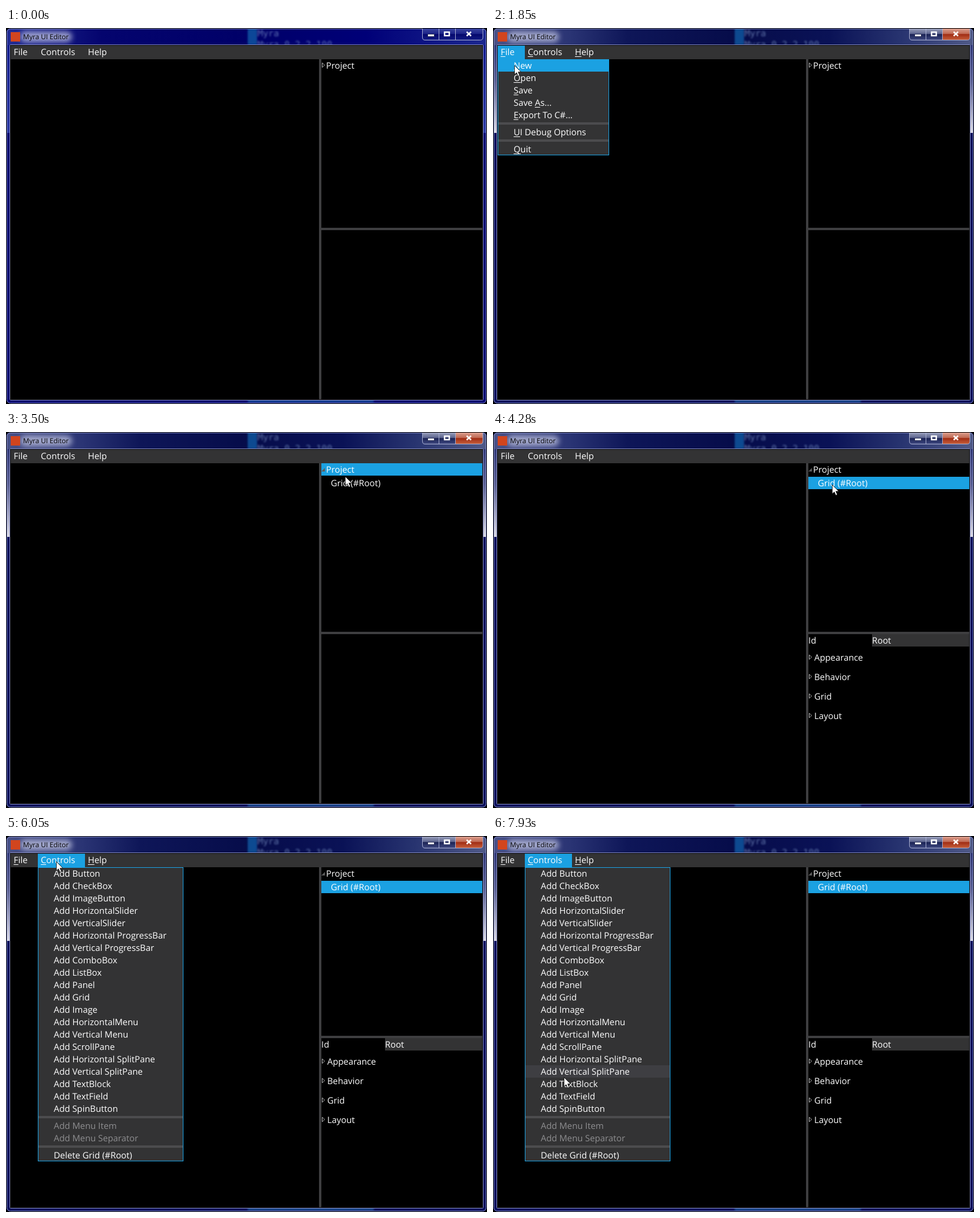
An HTML page that plays this animation: 816x638 px, repeating every 8000 ms.

```html
<!DOCTYPE html>
<html lang="en">
<head>
<meta charset="utf-8">
<title>Myra UI Editor</title>
<style>
  html, body { margin: 0; width: 100%; height: 100%; overflow: hidden; background: #000; }
  svg { display: block; width: 816px; height: 638px; }
  text { font: 14.85px "Open Sans", "Noto Sans", sans-serif; fill: #fff; white-space: pre; text-rendering: geometricPrecision; }
  .title { font-size: 11.6px; fill: #000; }
  .mono { font: 15px "DejaVu Sans Mono", monospace; fill: #8ca8d8; }
  .dim { fill: #8e8e90; }
</style>
</head>
<body>
<svg id="stage" viewBox="0 0 816 638" xmlns="http://www.w3.org/2000/svg">
  <defs>
    <filter id="blur" x="-30%" y="-100%" width="160%" height="300%"><feGaussianBlur stdDeviation="1.8"/></filter>
    <filter id="glow" x="-30%" y="-100%" width="160%" height="300%"><feGaussianBlur stdDeviation="5"/></filter>
    <clipPath id="pane"><rect x="1" y="1" width="814" height="636" rx="6"/></clipPath>
    <linearGradient id="barIdle">
      <stop offset="0" stop-color="#242e94"/><stop offset=".2" stop-color="#04046e"/>
      <stop offset=".5" stop-color="#000068"/><stop offset=".75" stop-color="#000078"/><stop offset="1" stop-color="#1c2890"/>
    </linearGradient>
    <linearGradient id="barLive">
      <stop offset="0" stop-color="#4a5288"/><stop offset=".16" stop-color="#2a3474"/><stop offset=".28" stop-color="#0e1658"/>
      <stop offset=".5" stop-color="#060c4a"/><stop offset=".7" stop-color="#0a1256"/>
      <stop offset=".85" stop-color="#283470"/><stop offset="1" stop-color="#505a88"/>
    </linearGradient>
    <linearGradient id="sideIdle" x2="0" y2="1">
      <stop offset="0" stop-color="#10188a"/><stop offset="1" stop-color="#2c3aa4"/>
    </linearGradient>
    <linearGradient id="sideLive" x2="0" y2="1">
      <stop offset="0" stop-color="#20286c"/><stop offset=".5" stop-color="#5a6094"/><stop offset="1" stop-color="#dcdce6"/>
    </linearGradient>
    <linearGradient id="btnIdle" x2="0" y2="1">
      <stop offset="0" stop-color="#3a44a0"/><stop offset=".45" stop-color="#1c2488"/>
      <stop offset=".5" stop-color="#04086c"/><stop offset="1" stop-color="#141c84"/>
    </linearGradient>
    <linearGradient id="btnLive" x2="0" y2="1">
      <stop offset="0" stop-color="#9aa0bc"/><stop offset=".45" stop-color="#5c648e"/>
      <stop offset=".5" stop-color="#1a2254"/><stop offset="1" stop-color="#404a82"/>
    </linearGradient>
    <linearGradient id="closeLive" x2="0" y2="1">
      <stop offset="0" stop-color="#dca090"/><stop offset=".45" stop-color="#c06852"/>
      <stop offset=".5" stop-color="#a02c14"/><stop offset="1" stop-color="#c8603c"/>
    </linearGradient>
  </defs>

  <g clip-path="url(#pane)">
    <g id="idle">
      <rect width="816" height="638" fill="#000070"/>
      <rect width="816" height="178" fill="url(#sideIdle)"/>
      <rect width="816" height="29" fill="url(#barIdle)"/>
    </g>
    <g id="live">
      <rect width="816" height="638" fill="#0a105c"/>
      <rect width="816" height="178" fill="url(#sideLive)"/>
      <rect width="816" height="29" fill="url(#barLive)"/>
    </g>
    <g filter="url(#blur)">
      <rect x="410" y="-6" width="16" height="35" fill="#1560a8" opacity=".75"/>
      <text class="mono" x="427" y="14" opacity=".65">Myra</text>
      <text class="mono" x="427" y="33" opacity=".65">Myra.0.2.2.100</text>
      <rect x="410" y="631" width="214" height="4" fill="#2c74b4" opacity=".7"/>
    </g>
    <rect x="24" y="6" width="88" height="18" rx="9" fill="#c4c8e4" opacity=".75" filter="url(#glow)"/>
  </g>
  <rect x="1.5" y="1.5" width="813" height="635" rx="6" fill="none" stroke="#8890c8"/>
  <rect x="8" y="7" width="16" height="16" fill="#d2451e"/>
  <text class="title" x="29" y="19">Myra UI Editor</text>

  <path id="buttons" d="M706.5 1V16Q706.5 20.5 711 20.5H804.5Q809 20.5 809 16V1Z" fill="url(#btnIdle)"/>
  <g id="liveButtons">
    <path d="M706.5 1V16Q706.5 20.5 711 20.5H762V1Z" fill="url(#btnLive)"/>
    <path d="M762 1V20.5H804.5Q809 20.5 809 16V1Z" fill="url(#closeLive)"/>
  </g>
  <path d="M706.5 1V16Q706.5 20.5 711 20.5H804.5Q809 20.5 809 16V1M734.5 1V20M762.5 1V20" fill="none" stroke="#a8aed0"/>
  <rect x="715.5" y="10.5" width="11" height="4" fill="#fff" stroke="#30365c"/>
  <rect x="744" y="7" width="8" height="6" fill="none" stroke="#fff" stroke-width="2.4"/>
  <path d="M781.5 6.5L789 13.5M789 6.5L781.5 13.5" stroke="#fff" stroke-width="2.4"/>

  <rect x="6.5" y="28.5" width="803" height="603" rx="1" fill="#000" stroke="#8a90c4"/>
  <rect x="8" y="30" width="800" height="23" fill="#333334"/>
  <rect x="531" y="53" width="4" height="577" fill="#3e3e40"/>
  <rect x="535" y="339" width="273" height="4" fill="#3e3e40"/>
</svg>

<script>
const NS = 'http://www.w3.org/2000/svg';
const stage = document.getElementById('stage');
const BLUE = '#1ba1e2', HOVER = '#3e3e42', PANEL = '#333334';
const LOOP = 8000, ROW = 21, TOP = 53;

function add(parent, tag, attrs, content) {
  const el = document.createElementNS(NS, tag);
  for (const k in attrs) el.setAttribute(k, attrs[k]);
  if (content) el.textContent = content;
  return parent.appendChild(el);
}
const group = (parent = stage) => add(parent, 'g', {});
const box = (parent, x, y, width, height, fill) => add(parent, 'rect', { x, y, width, height, fill });
const label = (parent, x, y, s, cls = '') => add(parent, 'text', { x, y, class: cls }, s);
const show = (el, on) => el.setAttribute('visibility', on ? 'visible' : 'hidden');
const arrow = (parent, y) => add(parent, 'path',
  { d: `M536.5 ${y - 4}V${y + 4}L540.5 ${y}Z`, fill: 'none', stroke: '#b4b4b4' });

// Underline the hot key letter of a label.
function hotkey(parent, text, x, y, i) {
  const pen = document.createElement('canvas').getContext('2d');
  pen.font = '14.85px "Open Sans", "Noto Sans", sans-serif';
  const start = pen.measureText(text.slice(0, i)).width;
  box(parent, Math.round(x + start), y + 2, Math.round(pen.measureText(text[i]).width), 1, '#fff');
}

// Menu bar
const bar = [['File', 8, 46], ['Controls', 54, 80], ['Help', 134, 54]].map(([name, x, w]) => {
  const back = box(stage, x, 30, w, 23, HOVER);
  label(stage, x + 5, 46, name);
  return { name, x, w, back };
});
const barKeys = group();
bar.forEach(b => hotkey(barKeys, b.name, b.x + 5, 46, 0));

// Tree
const projectBack = box(stage, 535, 53, 273, 21, HOVER);
const gridBack = box(stage, 535, 76, 273, 21, HOVER);
label(stage, 543, 69, 'Project');
const closedMark = group();
arrow(closedMark, 63);
const openTree = group();
add(openTree, 'path', { d: 'M541 61V67H535Z', fill: '#5c5c5c' });
label(openTree, 551, 92, 'Grid (#Root)');

// Properties
const props = group();
box(props, 643, 343, 165, 21, PANEL);
label(props, 535, 359, 'Id');
label(props, 643, 359, 'Root');
['Appearance', 'Behavior', 'Grid', 'Layout'].forEach((s, i) => {
  arrow(props, 382 + 33 * i);
  label(props, 545, 388 + 33 * i, s);
});

// A null item is a separator, "_" marks a hot key, a leading "~" a disabled item.
function menu(x, w, items) {
  const g = group(), back = box(g, x, TOP, w, 0, PANEL);
  const rows = [];
  let y = TOP;
  for (const item of items) {
    if (!item) {
      box(g, x + 1, y + 2, w - 2, 4, '#4c4c4e');
      y += 8;
      continue;
    }
    const off = item[0] === '~', key = item.indexOf('_');
    const text = item.replace(/[~_]/, '');
    const rowBack = box(g, x + 1, y, w - 2, ROW, HOVER);
    label(g, x + 27, y + 16, text, off ? 'dim' : '');
    if (key >= 0) hotkey(g, text, x + 27, y + 16, key);
    rows.push({ y, off, back: rowBack });
    y += ROW;
  }
  back.setAttribute('height', y - TOP);
  add(g, 'rect', { x: x + .5, y: TOP + .5, width: w - 1, height: y - TOP - 1, fill: 'none', stroke: BLUE });
  return { g, x, w, rows };
}
const fileMenu = menu(8, 189, ['_New', '_Open', '_Save', 'Save _As...', '_Export To C#...', null,
  '_UI Debug Options', null, '_Quit']);
const controls = ['Button', 'CheckBox', 'ImageButton', 'HorizontalSlider', 'VerticalSlider',
  'Horizontal ProgressBar', 'Vertical ProgressBar', 'ComboBox', 'ListBox', 'Panel', 'Grid', 'Image',
  'HorizontalMenu', 'Vertical Menu', 'ScrollPane', 'Horizontal SplitPane', 'Vertical SplitPane',
  'TextBlock', 'TextField', 'SpinButton'];
const controlsMenu = menu(54, 247, [...controls.map(s => 'Add ' + s), null,
  '~Add Menu Item', '~Add Menu Separator', null, 'Delete Grid (#Root)']);

const cursor = add(stage, 'path', {
  d: 'M.5 .5V16L4 12.7L6.6 18.5L9.2 17.4L6.7 11.7H11.6Z', fill: '#fff', stroke: '#000', 'stroke-width': .8
});

// Pointer moves: start, end, steps, from, bend, to
const moves = [
  [70, 820, 11, [718, 569], [330, 270], [25, 43]],
  [910, 1470, 8, [25, 43], [28, 56], [36, 63]],
  [2020, 2790, 11, [36, 63], [566, 160], [575, 71]],
  [2880, 2950, 2, [575, 71], [575, 70], [575, 69]],
  [3500, 3670, 3, [575, 69], [575, 79], [575, 89]],
  [4520, 4980, 7, [575, 89], [380, 178], [169, 119]],
  [5130, 5670, 8, [169, 119], [115, 75], [85, 43]],
  [6280, 7070, 11, [85, 43], [103, 166], [106, 289]],
  [7160, 7930, 11, [106, 289], [114, 349], [120, 409]]
];
const ease = u => .35 * u + .65 * u * u * (3 - 2 * u);

function pointer(t) {
  const [start, end, n, a, b, c] = moves.filter(m => m[0] <= t).pop() || moves[0];
  const step = Math.floor((t - start) / (end - start) * (n - 1) + .1);
  const u = ease(Math.max(0, Math.min(1, (step + 1) / n)));
  return a.map((p, i) => Math.round((1 - u) ** 2 * p + 2 * u * (1 - u) * b[i] + u * u * c[i]));
}

function paint(el, on, selected) {
  show(el, on || selected);
  el.setAttribute('fill', selected ? BLUE : HOVER);
}

function drawMenu(m, open, x, y, pressed) {
  m.g.style.display = open ? '' : 'none';
  for (const r of m.rows) {
    const over = open && !r.off && x >= m.x && x < m.x + m.w && y >= r.y && y < r.y + ROW;
    paint(r.back, over, over && pressed);
  }
}

const live = document.getElementById('live'), liveButtons = document.getElementById('liveButtons');

function draw(t) {
  const [x, y] = pointer(t), here = t >= 70;
  const active = Math.max(0, Math.min(1, (t - 830) / 240)) * (t >= 910);
  live.setAttribute('opacity', active);
  liveButtons.setAttribute('opacity', active);

  const fileOpen = t >= 990 && t < 2020, controlsOpen = t >= 6050;
  bar.forEach((b, i) => paint(b.back,
    here && y >= 30 && y < 53 && x >= b.x && x < b.x + b.w,
    i === 0 && fileOpen || i === 1 && controlsOpen));
  show(barKeys, fileOpen || controlsOpen);
  drawMenu(fileMenu, fileOpen, x, y, t >= 1850);
  drawMenu(controlsMenu, controlsOpen, x, y, false);

  const expanded = t >= 3270, rooted = t >= 4280, inTree = here && x >= 535;
  paint(projectBack, inTree && y >= 53 && y < 74, t >= 3120 && !rooted);
  paint(gridBack, expanded && inTree && y >= 76 && y < 97, rooted);
  show(closedMark, !expanded);
  show(openTree, expanded);
  show(props, rooted);

  show(cursor, here);
  cursor.setAttribute('transform', `translate(${x} ${y})`);
}

const began = performance.now();
function tick() {
  draw((performance.now() - began) % LOOP);
  requestAnimationFrame(tick);
}
tick();
</script>
</body>
</html>
```
